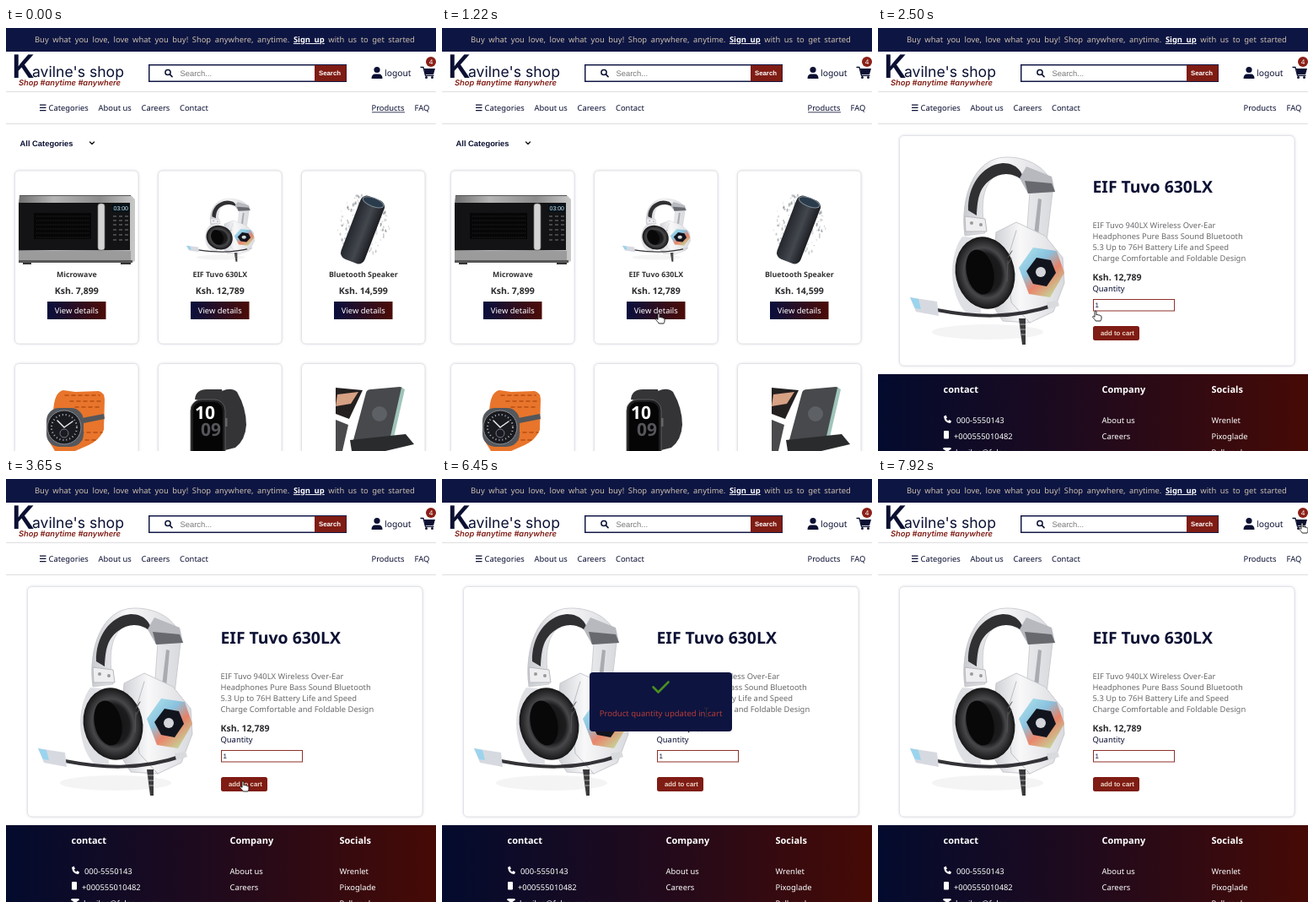
An HTML page for the animation above (8000 ms loop, 510x501 px).

```html
<!DOCTYPE html>
<html lang="en">
<head>
<meta charset="utf-8">
<title>Shop walkthrough</title>
<style>
  html, body { margin: 0; width: 100%; height: 100%; overflow: hidden; background: #fff; }
  svg { display: block; width: 100%; height: 100%; }
  text { font: 9.4px "Noto Sans", sans-serif; fill: #0b1033; text-rendering: geometricPrecision; white-space: pre; }
  .ui { font-family: "Liberation Sans", sans-serif; }
  .b { font-weight: 700; }
  .mid { text-anchor: middle; }
  .light { fill: #fff; }
  .banner { fill: #cbbfae; word-spacing: 2.15px; }
  .banner tspan { fill: #fff; font-weight: 700; text-decoration: underline; }
  .initial { font: 600 38px Inter, sans-serif; }
  .brand { font: 400 17.6px Inter, sans-serif; }
  .tag { font: italic 600 9.3px Inter, sans-serif; fill: #7f1c14; }
  .name { font-size: 8.8px; fill: #333; }
  .price { font-size: 10.55px; fill: #2b2b2f; }
  .desc { fill: #6a6a6e; }
  .head { font-size: 11px; }
  .small { font-size: 7.8px; }
  .card { fill: #fff; stroke: #e2e3e8; filter: drop-shadow(0 0 1.5px #dcdee6); }
  .line { fill: none; stroke-linecap: round; stroke-linejoin: round; }
</style>
</head>
<body>
<svg viewBox="0 0 510 501">
  <defs>
    <linearGradient id="blend"><stop stop-color="#0a0f3d"/><stop offset="1" stop-color="#4c0c07"/></linearGradient>
    <linearGradient id="floor"><stop stop-color="#030b2e"/><stop offset=".5" stop-color="#210a1c"/><stop offset="1" stop-color="#460a05"/></linearGradient>
    <linearGradient id="steel"><stop stop-color="#6f6f70"/><stop offset=".3" stop-color="#b4b4b4"/><stop offset=".7" stop-color="#8c8c8c"/><stop offset="1" stop-color="#c9c9c9"/></linearGradient>
    <linearGradient id="shell"><stop stop-color="#c9cbd0"/><stop offset=".4" stop-color="#f8f8f9"/><stop offset="1" stop-color="#d9dade"/></linearGradient>
    <linearGradient id="glow" x2=".8" y2="1"><stop stop-color="#9fe3ea"/><stop offset=".4" stop-color="#73b8dc"/><stop offset=".65" stop-color="#e86a4a"/><stop offset="1" stop-color="#b8e08e"/></linearGradient>
    <linearGradient id="tube"><stop stop-color="#24272d"/><stop offset=".55" stop-color="#43474e"/><stop offset="1" stop-color="#1b1d22"/></linearGradient>
    <radialGradient id="pad"><stop stop-color="#111"/><stop offset=".55" stop-color="#1c1c1e"/><stop offset=".7" stop-color="#48484b"/><stop offset="1" stop-color="#161617"/></radialGradient>

    <g id="headset">
      <ellipse cx="130" cy="360" rx="66" ry="9" fill="#f4f4f5"/>
      <path d="M103 246C97 200 114 154 151 153C184 152 208 172 207 194L199 262L176 250L180 194C174 177 157 168 142 174C124 182 121 210 127 243Z" fill="url(#shell)" stroke="#c3c5ca" stroke-width=".8"/>
      <path d="M107 216C106 188 123 162 148 160C165 160 172 171 173 182C160 170 145 171 133 180C119 190 118 205 117 222Z" fill="#303033"/>
      <path d="M168 178L176 164L206 176L210 194L178 196Z" fill="#b7b9be"/>
      <path d="M174 181L206 184L210 194L178 196Z" fill="#67696f"/>
      <path d="M103 223L127 226L129 241L104 241Z" fill="#eeeef0" stroke="#b7b9be"/>
      <circle cx="111" cy="231" r="2" fill="#999"/><circle cx="122" cy="233" r="2" fill="#999"/>
      <path d="M190 202L194 203L190 247L185 245Z" fill="#a9abb0"/>
      <path d="M100 247C83 270 84 315 104 337L122 338L116 248Z" fill="#dfe0e4"/>
      <path d="M140 242L164 230L198 246L219 272L221 302L208 336L180 349L148 347L134 325Z" fill="url(#shell)" stroke="#c7c9ce"/>
      <path d="M164 240L153 276L158 325L180 349" class="line" stroke="#babdc3"/>
      <ellipse cx="127" cy="290" rx="35" ry="43" fill="url(#pad)" transform="rotate(-13 127 290)"/>
      <ellipse cx="121" cy="289" rx="16" ry="27" fill="#080809" transform="rotate(-13 121 289)"/>
      <path d="M154 272l5-8M154 280l4-7M153 300l1-24" class="line" stroke="#555"/>
      <path d="M167 284L184 260L212 264L221 290L204 319L179 315Z" fill="url(#glow)" opacity=".8"/>
      <path d="M176 288L188 272L205 275L211 290L200 306L184 303Z" fill="#12141d"/>
      <circle cx="193" cy="289" r="6" fill="#d4d6dc"/>
      <path d="M70 334C112 342 158 346 212 327" class="line" stroke="#333337" stroke-width="4"/>
      <path d="M200 325l13-2 2 6-13 4Z" fill="#d9dade"/>
      <path d="M38 319L70 324L72 341L45 336Z" fill="#d7d9e0"/><path d="M38 319L48 321L51 333L44 332Z" fill="#9bd4ee"/>
      <path d="M167 344L175 344L175 375L171 375Z" fill="#3a3a3d"/>
      <path d="M168 351h7M169 357h6M170 363h5" stroke="#aaa"/>
    </g>

    <path id="arrow" d="M0 0V11L2.6 8.6L4.4 12.4L6 11.6L4.3 8H7.8Z" fill="#fff" stroke="#111" stroke-width=".8"/>
    <path id="hand" d="M0 1C0-.4 2-.4 2 1V5C3 4 4 4.4 4.2 5.2C5 4.5 6 5 6.2 5.8C7.2 5.3 8 6 8 7V9C8 10.5 7.4 11 7 12H1.2C.6 10.4-1.6 9-2.3 7.4C-2.6 6.4-1.4 6-.6 6.8L0 7.4Z" fill="#fff" stroke="#111" stroke-width=".9"/>
    <path id="ibeam" d="M-2-5.5Q0-5.5 0-4V4Q0 5.5-2 5.5M2-5.5Q0-5.5 0-4M0 4Q0 5.5 2 5.5" class="line" stroke="#333" stroke-width=".9"/>
    <path id="cross" d="M-4 0H4M0-4V4" stroke="#8b8591" stroke-width=".9"/>
  </defs>

  <rect width="510" height="501" fill="#fff"/>
  <rect width="510" height="28" fill="#0d1542"/>
  <text class="banner" x="34" y="17">Buy what you love, love what you buy! Shop anywhere, anytime. <tspan>Sign up</tspan> with us to get started</text>

  <text class="initial" x="7" y="59">K</text>
  <text class="brand" x="31" y="58">avilne's shop</text>
  <text class="tag" x="15" y="68">Shop #anytime #anywhere</text>

  <rect x="169.75" y="43.75" width="233.5" height="19.5" fill="#fff" stroke="#131947" stroke-width="1.5"/>
  <circle cx="192" cy="52.5" r="3.1" fill="none" stroke="#0b1033" stroke-width="1.5"/>
  <path d="M194.4 55L197 57.6" class="line" stroke="#0b1033" stroke-width="1.7"/>
  <text class="ui" x="206.5" y="56.5" style="fill:#777">Search...</text>
  <rect x="366" y="44" width="37.5" height="19" fill="#7f1c14"/>
  <text class="ui b small light" x="371" y="56">Search</text>

  <g fill="#0b1033">
    <circle cx="440" cy="49.5" r="3.6"/><path d="M433.5 60Q433.5 54.5 438 54.5H442Q446.5 54.5 446.5 60Z"/>
    <path d="M496 48H509L507 55H497Z"/><circle cx="498.5" cy="58.5" r="1.5"/><circle cx="505.5" cy="58.5" r="1.5"/>
    <path d="M492 46.5H495L497.5 56.3H507" class="line" stroke="#0b1033" stroke-width="1.3"/>
    <path d="M40 90.5h7.5v1.3H40zM40 93.7h7.5v1.3H40zM40 96.9h7.5v1.3H40z"/>
  </g>
  <text x="449" y="57" style="font-size:10.3px">logout</text>
  <circle cx="504" cy="40" r="6" fill="#8a1f17"/>
  <text class="light mid" x="504" y="43" style="font-size:8px">4</text>

  <path d="M0 75.5H510M0 113.5H510" stroke="#dedee2"/>
  <text x="50.5" y="98">Categories</text><text x="109.5" y="98">About us</text>
  <text x="160.5" y="98">Careers</text><text x="206" y="98">Contact</text>
  <text x="433.5" y="98">Products</text><text x="484.5" y="98">FAQ</text>

  <g id="listing">
    <path d="M434 99.8H473" stroke="#0b1033" stroke-width=".8"/>
    <text class="ui b" x="16.5" y="140">All Categories</text>
    <path d="M99.5 135L102 137.5L104.5 135" class="line" stroke="#111" stroke-width="1.3"/>
    <g id="cards"></g>

    <path d="M16 198H148L153 203V276L149 278H15V208Z" fill="url(#steel)"/>
    <path d="M16 198.500H148" stroke="#555"/>
    <path d="M15 207H147V263H15Z" fill="#131315"/>
    <path d="M15 264H148V275H15Z" fill="#9b9b9b"/><path d="M15 275H150V278H15Z" fill="#565657"/>
    <rect x="33" y="219" width="68" height="31" fill="#060607"/>
    <path d="M36 223H99M36 228H99M36 233H99M36 238H99M36 243H99M36 248H99" stroke="#252528" stroke-dasharray="1 1"/>
    <rect x="109" y="208" width="8" height="55" rx="3" fill="#d4d4d4" stroke="#777" stroke-width=".7"/>
    <rect x="126" y="209" width="20" height="9" fill="#04121b"/>
    <text class="ui" x="127.500" y="216" style="font-size:7px;fill:#d6edf6">03:00</text>
    <path d="M127 223H146M127 228H146M127 233H146M127 239H146M127 245H146M127 251H146" stroke="#57575c" stroke-width="1.5" stroke-dasharray="4 3"/>
    <path d="M20 278h10v2H20zM136 278h12v2h-12z" fill="#333"/>

    <use href="#headset" transform="translate(197.3 151) scale(.44 .335)"/>

    <g id="splash" fill="#8f9499"></g>
    <g transform="rotate(21 423 239)">
      <rect x="408" y="199" width="30" height="80" rx="8" fill="url(#tube)"/>
      <ellipse cx="423" cy="204" rx="13" ry="5" fill="#2a3c4c" stroke="#7d8a95"/>
    </g>

    <path d="M56 455Q57 431 68 429L82 431L110 430Q117 432 117 440L116 476Q111 488 98 494L82 501H58L50 488Z" fill="#e8752b"/>
    <path d="M70 435H111M76 442H113M82 449H114M88 479H114M86 488H107" class="line" stroke="#b84d12" stroke-width="1.5" stroke-dasharray="4 4"/>
    <path d="M90 462L116 457L117 463L92 468Z" fill="#55565a"/>
    <rect x="48" y="450" width="44" height="46" rx="15" fill="#55585d"/>
    <circle cx="69" cy="473" r="20" fill="#191b20" stroke="#8a8d91"/>
    <circle cx="69" cy="473" r="15" fill="none" stroke="#b8bcc0" stroke-width="2" stroke-dasharray="1 3"/>
    <circle cx="69" cy="480" r="5" fill="none" stroke="#778"/><path d="M69 473L61 465M69 473L79 466" class="line" stroke="#eee" stroke-width="1.5"/>

    <path d="M256 430Q267 425 274 431Q285 450 285 470Q284 488 272 497L256 501Z" fill="#343437"/>
    <path d="M224 440Q225 428 238 428H256L260 446Z" fill="#353538"/>
    <rect x="219" y="440" width="41" height="75" rx="13" fill="#1e1e20" stroke="#5c5c60"/>
    <rect x="222" y="443" width="35" height="70" rx="10" fill="#050506"/>
    <text class="b light" x="224" y="463" style="font-size:21px">10</text>
    <text class="b" x="231" y="483" style="font-size:21px;fill:#55565b">09</text>
    <path d="M260 462h2.5v10H260z" fill="#666"/>

    <path d="M391 426L423 429L407 463L391 457Z" fill="#242020"/>
    <path d="M393 434L418 431L409 445L391 448Z" fill="#d7a184"/>
    <path d="M391 464L406 470L399 501H391Z" fill="#4a4a4d"/>
    <path d="M427 432Q428 428 433 428L467 425Q472 425 470 431L456 487L412 488Z" fill="#47494c"/>
    <path d="M469 426L473 428L459 489L455 488Z" fill="#9fc4ba"/>
    <circle cx="443" cy="457" r="9" fill="#5d6064"/>
    <path d="M408 488L474 481L484 493L450 501H410Z" fill="#2a2b2d"/>
  </g>

  <g id="product">
    <rect class="card" x="25.5" y="127.5" width="468.5" height="272.5" rx="5"/>
    <use href="#headset"/>
    <text class="b" x="254.5" y="195" style="font-size:19.4px">EIF Tuvo 630LX</text>
    <text class="desc" x="254.5" y="237">EIF Tuvo 940LX Wireless Over-Ear</text>
    <text class="desc" x="254.5" y="250">Headphones Pure Bass Sound Bluetooth</text>
    <text class="desc" x="254.5" y="263">5.3 Up to 76H Battery Life and Speed</text>
    <text class="desc" x="254.5" y="276">Charge Comfortable and Foldable Design</text>
    <text class="b price" x="254.5" y="299">Ksh. 12,789</text>
    <text x="254.5" y="312">Quantity</text>
    <rect x="255.5" y="321.5" width="96" height="13.5" fill="#fff" stroke="#8f3029"/>
    <text class="ui" x="257.5" y="331" style="font-size:8px">1</text>
    <rect x="255" y="353" width="55" height="17" rx="2.5" fill="#7f1c14"/>
    <text class="ui b small" x="264" y="364" style="fill:#ecd6c6">add to cart</text>

    <rect y="410" width="510" height="91" fill="url(#floor)"/>
    <g id="footer"></g>
    <g fill="#fff">
      <path d="M78 460L80.5 458.5L82 461.5L80.8 462.5Q81.5 464.5 83.3 465.3L84.5 464L87 465.5L86 468Q79 468 78 460Z"/>
      <rect x="78" y="477" width="6" height="9.5" rx="1"/>
      <path d="M77 498.5Q77 497 78.5 497H85.5Q87 497 87 498.5L82 502Z"/>
    </g>
  </g>

  <g id="popup">
    <rect x="175" y="229" width="169" height="70" rx="4" fill="#0d1440"/>
    <path d="M250.5 246.5L256.5 252.5L268.5 240.5" class="line" stroke="#4b8f22" stroke-width="2.6"/>
    <text class="mid" x="259.5" y="281" style="font-size:9.55px;fill:#b53c38">Product quantity updated in cart</text>
  </g>

  <use id="cursor"/>
</svg>
<script>
const LOOP = 8000, PRODUCT_AT = 1600, POPUP = [6330, 7500];
const $ = id => document.getElementById(id);
const label = (cls, x, y, s) => `<text class="${cls}" x="${x}" y="${y}">${s}</text>`;
const show = (id, on) => { $(id).style.display = on ? '' : 'none'; };

const items = [['Microwave', '7,899'], ['EIF Tuvo 630LX', '12,789'], ['Bluetooth Speaker', '14,599']];
$('cards').innerHTML = items.map(([name, price], i) => {
  const x = 10.5 + i * 170, mid = x + 73.3;
  const card = y => `<rect class="card" x="${x}" y="${y}" width="146.5" height="205" rx="5"/>`;
  return card(169) + card(397.5) +
    label('b name mid', mid, 295, name) + label('b price mid', mid, 315, 'Ksh. ' + price) +
    `<rect x="${mid - 34.8}" y="324" width="69.5" height="21" fill="url(#blend)"/>` +
    label('light mid', mid, 338, 'View details');
}).join('');

const columns = [
  [77.5, 'contact', ['000-5550143', '+000555010482', 'kavilne@folspy.zq.ov'], [93, 90, 92]],
  [265.5, 'Company', ['About us', 'Careers']],
  [395.5, 'Socials', ['Wrenlet', 'Pixoglade', 'Palbrook']],
];
$('footer').innerHTML = columns.map(([x, head, rows, xs]) =>
  label('b head light', x, 432, head) +
  rows.map((s, i) => label('light', xs ? xs[i] : x, 468 + i * 19, s)).join('')).join('');

// Water drops scattered around the speaker.
let seed = 7;
const random = () => (seed = seed * 16807 % 2147483647) / 2147483647;
$('splash').innerHTML = Array.from({ length: 150 }, () => {
  const a = random() * 6.283, d = 0.4 + random() * 0.6;
  return `<ellipse cx="${424 + Math.cos(a) * 31 * d}" cy="${235 + Math.sin(a) * 38 * d}" rx="${0.3 + random()}" ry="${0.4 + random() * 2}" opacity="${0.2 + random() * 0.6}"/>`;
}).join('');

// Pointer steps: time, x, y, shape until the next step. Equal places are rests.
const steps = [
  [0, 320, 515, 'arrow'], [150, 320, 515, 'arrow'],
  [710, 262, 347, 'hand'], [840, 262, 347, 'hand'], [910, 258, 341, 'hand'],
  [1030, 258, 341, 'hand'], [1220, 256, 338, 'hand'], [PRODUCT_AT, 256, 338, 'hand'],
  [1800, 257, 335, 'hand'], [2680, 257, 335, 'arrow'],
  [3190, 278, 355, 'hand'], [3370, 278, 355, 'hand'], [3490, 280, 358, 'hand'],
  [4580, 280, 358, 'arrow'], [4780, 311, 289, 'ibeam'], [4920, 311, 289, 'ibeam'],
  [4960, 316, 282, 'ibeam'], [5110, 316, 282, 'ibeam'], [5130, 313.5, 276.5, 'ibeam'],
  [6480, 313.5, 276.5, 'arrow'], [6980, 254.5, 468, 'cross'],
  [7480, 254.5, 468, 'arrow'], [7860, 502, 52, 'hand'], [LOOP, 502, 52, 'hand'],
];

function draw() {
  const t = performance.now() % LOOP;
  show('listing', t < PRODUCT_AT);
  show('product', t >= PRODUCT_AT);
  show('popup', t >= POPUP[0] && t < POPUP[1]);
  const i = steps.findIndex(s => s[0] > t) - 1;
  const [t0, x0, y0, shape] = steps[i], [t1, x1, y1] = steps[i + 1];
  const p = (t - t0) / (t1 - t0), k = p * (2 - p);
  $('cursor').setAttribute('href', '#' + shape);
  $('cursor').setAttribute('transform', `translate(${x0 + (x1 - x0) * k} ${y0 + (y1 - y0) * k})`);
  requestAnimationFrame(draw);
}
draw();
</script>
</body>
</html>
```
